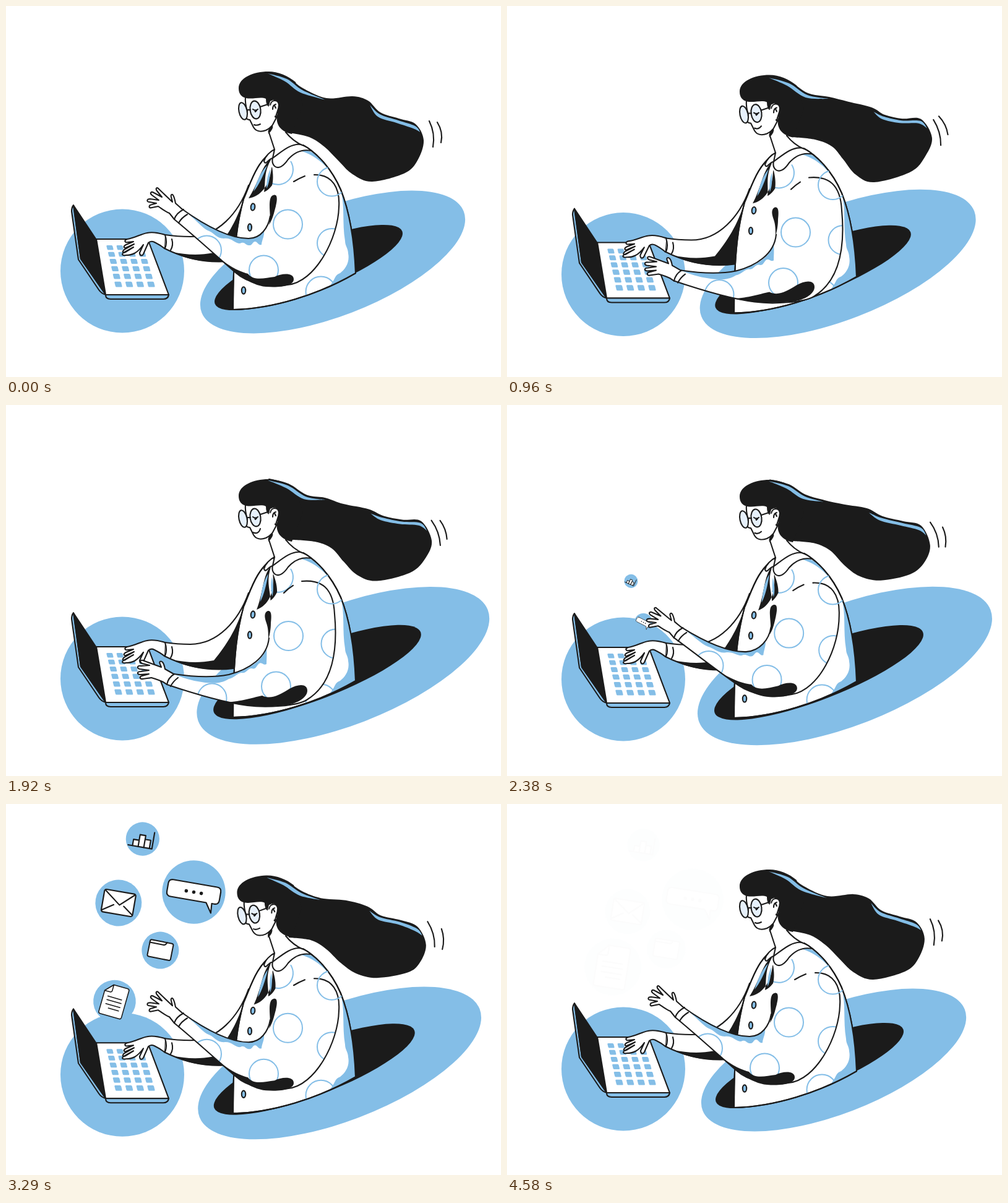
Recreate the animation shown at these times as an HTML page. Size 800 by 600 pixels, loop 4.62 s.

```html
<!DOCTYPE html>
<html lang="en">
<head>
<meta charset="utf-8">
<title>Typing</title>
<style>
html, body { margin: 0; width: 100%; height: 100%; overflow: hidden; background: #fff }
svg { display: block; width: 100vw; height: 100vh }
.line { fill: none; stroke: #1b1b1b; stroke-width: 2.1; stroke-linecap: round; stroke-linejoin: round }
.white { fill: #fff }
.blue { fill: #84bee7 }
.black { fill: #1b1b1b }
.ring { fill: none; stroke: #84bee7; stroke-width: 2 }
.line.white { fill: #fff }
.line.blue { fill: #84bee7 }
.line.black { fill: #1b1b1b }
</style>
</head>
<body>
<svg viewBox="0 0 800 600">
  <defs>
    <clipPath id="torsoClip"><use href="#torso"/></clipPath>
    <clipPath id="armClip"><path id="armMask"/></clipPath>
  </defs>
  <ellipse id="rim" class="blue" rx="227" ry="87.3"/>
  <ellipse id="pit" class="black" rx="162.3" ry="39"/>
  <circle id="disc" class="blue" cx="188" cy="428.5" r="100"/>
  <g id="icons"></g>
  <path id="hair" class="black"/>
  <path id="swish" class="line"/>
  <g id="figure">
    <path class="line blue" d="M109 322Q106 326 106 332L117 410L150 459Q154 465 161 467L121 409Z"/>
    <path class="line black" d="M109.500 323L146 378L161 466L121 409Z"/>
    <path class="line white" d="M146 377H229L263 467H161Z"/>
    <path class="line blue" d="M161 467H263Q262 474 254 474H169Q161 474 161 467Z"/>
    <g id="keys" class="blue"></g>

    <path class="line white" d="M392 290C376 335 342 373 298 373C282 373 270 372 257 370L256 392C280 404 320 418 368 412L384 312Z"/>
    <path class="black" d="M384 312C372 350 356 374 336 399C310 404 290 402 268 398C300 413 335 417 368 412L372 370Z"/>
    <g id="farHand">
      <path class="line white" d="M257 370C247 367 237 365 228 367C217 369 209 375 196 377C190 379 192 383 197 382L206 381L194 386C188 389 191 393 196 390L207 385L191 394C187 398 189 400 193 398L206 390L190 399C186 402 189 404 194 403C204 403 212 400 222 386L216 399C216 404 220 405 222 401L230 383Q234 379 240 382Q250 387 256 392"/>
    </g>
    <path class="line" d="M257 370Q261 382 257 392M268 377Q271 387 266 395"/>

    <path id="torso" class="line white" d="M434 232C404 252 396 285 384 312C375 345 367 385 367 491C430 490 505 467 565 432C563 380 556 335 541 297C525 260 500 236 480 225Z"/>
    <g clip-path="url(#torsoClip)">
      <path class="blue" d="M541 297C556 335 563 380 565 432L523 453C534 440 530 436 540 432C548 426 556 415 553 400C553 392 548 388 548 380C543 350 548 325 541 297ZM475 234C492 230 512 244 526 270C510 250 495 240 475 234Z"/>
      <path class="ring" d="M460 251A24.500 24.500 0 0 1 428 286"/>
      <circle class="ring" cx="509" cy="462" r="24.500"/>
    </g>
    <path class="line" d="M434 232C404 252 396 285 384 312C375 345 367 385 367 491C430 490 505 467 565 432C563 380 556 335 541 297C525 260 500 236 480 225"/>
    <g class="line blue">
      <ellipse cx="399" cy="325" rx="3.300" ry="5.600" transform="rotate(6 399 325)"/>
      <ellipse cx="394" cy="358" rx="3" ry="5.600"/>
      <ellipse cx="384" cy="460" rx="3.200" ry="5.600"/>
    </g>

    <path class="white" d="M424 196L434 234L456 246L482 227L452 204L438 170Z"/>
    <path class="line" d="M424.500 203L434 232M452 204Q463 218 480 226"/>
    <g id="head">
      <path class="line white" d="M387 146C386 158 388 164 390 170L388 180Q389 184 394 184C396 188 398 192 400 196C404 203 412 204 420 201Q428 197 431 192L440 175L430 140Z"/>
      <path class="black" d="M424 207Q422 197 431 192Q433 199 424 207Z"/>
      <path class="black" d="M376 133C376 116 400 106 424 106C440 106 456 113 468 123L480 160L462 207C446 204 432 192 440 170L441 158L434 151L427 154L424.500 163Q420 160 420 150C412 146 400 151 388 149Q376 146 376 133Z"/>
      <path class="line white" d="M427 161C428 151 440 150 441 160C441 168 437 172 436 180L428 172"/>
      <path class="white" d="M422 165L428 160L436 174L430 188Z"/>
      <path class="line" d="M431 167Q431 160 436 159M434 161L436 165"/>
      <g class="line" style="fill:#e6f0fb">
        <ellipse cx="383" cy="170" rx="6.500" ry="14" transform="rotate(-12 383 170)"/>
        <ellipse cx="403" cy="168" rx="8.500" ry="14.500" transform="rotate(-8 403 168)"/>
      </g>
      <path class="line" d="M390 168H395M411 163L423 159"/>
      <path class="line" d="M399 167Q403 170 407 167M402 169L403 171L405 169"/>
      <path id="mouth" class="line"/>
    </g>
    <g id="scarf">
      <path class="black" d="M426 249C412 262 407 288 392 311C412 308 426 290 429 262L430 260C432 272 432 282 430 290Q424 298 417 301C420 285 416 270 428 249Z"/>
      <path class="blue" d="M422 258C412 268 407 280 400 300C408 291 416 274 422 258ZM427 264C422 275 421 286 421 295C425 288 427 276 427 264Z"/>
    </g>
    <path class="line white" d="M434 232C427 235 419 243 417 251Q418 255 421 253Q427 247 431 246Z"/>
    <path class="line white" d="M431 246C445 236 460 222 476 224Q486 227 493 234C478 231 465 238 456 248C448 260 440 264 434 259Q429 254 431 246Z"/>

    <g id="arm"></g>
    <circle class="ring" cx="526.500" cy="284" r="23.500" clip-path="url(#torsoClip)"/>
  </g>
  <path id="shine1" class="blue"/>
  <path id="shine2" class="blue"/>
  <path id="trail1" class="line" d="M268 286Q242 308 236 340"/>
  <path id="trail2" class="line" d="M281 289Q258 305 250 335"/>
</svg>
<script>
const LOOP = 4620, TIMES = [0, 1380, 2750, 3880];
const $ = id => document.getElementById(id);
const set = (el, name, value) => el.setAttribute(name, value);
const NUMBER = /-?\d+(\.\d+)?/g;
const numbers = text => text.match(NUMBER).map(Number);
const clamp = x => Math.max(0, Math.min(1, x));
const smooth = (t, a, b) => { const u = clamp((t - a) / (b - a)); return u * u * (3 - 2 * u); };
const cubic = u => u < .5 ? 4 * u ** 3 : 1 - 4 * (1 - u) ** 3;

// Replaces each number of path a by its blend with path b; arc flags stay whole.
function mix(a, b, p) {
  const to = numbers(b);
  let i = 0;
  return a.replace(NUMBER, n => +(+n + (to[i++] - n) * p).toFixed(2));
}

// Periodic spline in time through four poses.
function pose(keys, t) {
  const n = TIMES.length, at = i => TIMES[(i + n) % n] + LOOP * Math.floor(i / n);
  const i = TIMES.findLastIndex(k => k <= t), span = at(i + 1) - at(i), u = (t - at(i)) / span;
  const key = k => keys[(k + n) % n];
  return key(i).map((v, c) => {
    const a = key(i - 1)[c], w = key(i + 1)[c], z = key(i + 2)[c];
    const m = (w - a) / (at(i + 1) - at(i - 1)) * span, k = (z - v) / (at(i + 2) - at(i)) * span;
    const s = u * u * (3 - 2 * u);
    return v + (w - v) * s + m * u * (1 - u) ** 2 + k * u * u * (u - 1);
  });
}

// Smooth open curve through points.
function curve(points, start = 'M') {
  const at = i => points[Math.max(0, Math.min(points.length - 1, i))];
  let d = start + at(0).join(' ');
  for (let i = 0; i < points.length - 1; i++) {
    const [a, b, c, e] = [at(i - 1), at(i), at(i + 1), at(i + 2)];
    d += `C${b[0] + (c[0] - a[0]) / 6} ${b[1] + (c[1] - a[1]) / 6} ${c[0] - (e[0] - b[0]) / 6} ${c[1] - (e[1] - b[1]) / 6} ${c[0]} ${c[1]}`;
  }
  return d;
}

const HAIR = [
  '424 106 455 115 480 133 518 149 560 146 585 153 605 172 635 182 662 191 675 217 666 248 645 270 592 284 560 272 537 250 515 228 490 212 458 205',
  '424 116 457 125 488 144 520 147 548 158 590 168 612 178 640 183 671 182 690 213 680 241 655 268 595 285 565 273 545 248 528 228 500 218 460 215',
  '424 120 455 128 480 144 510 155 545 160 580 166 605 180 640 189 668 199 681 230 672 258 650 275 605 283 570 277 545 262 520 237 495 224 460 220',
  '421 110 450 119 478 137 510 148 555 150 590 164 607 179 635 185 662 195 677 222 666 252 648 269 592 280 560 270 537 250 515 230 492 215 455 210'
].map(numbers);
const SWISH = [
  '684 186 694 206 690 228 697 188 707 204 703 221',
  '690 184 703 203 704 225 699 178 711 190 715 207',
  '682 191 695 209 695 231 705 203 711 219 706 236',
  '682 188 693 209 691 230 701 196 708 212 705 229'
].map(numbers);

// Near arm: raised and typing shapes.
const TOP = ['M284 328C320 354 360 376 392 376C412 376 424 358 427 340',
             'M281 422C315 427 345 428 370 423C402 415 432 396 435 364'];
const UNDER = ['M498 273C528 272 540 295 538 325C537 375 500 447 455 451C425 456 390 448 372 432C355 418 320 385 272 345',
               'M488 272C520 269 539 283 541 325C547 390 536 440 496 464C480 474 430 477 400 473C370 469 320 456 270 439'];
const outline = k => TOP[k] + 'L' + UNDER[k].slice(1) + 'Z';
const ring = (x, y) => `M${x - 23.5} ${y}a23.5 23.5 0 1 0 47 0a23.5 23.5 0 1 0 -47 0`;
const ARM = [
  ['white', outline(0), outline(1)],
  ['blue', 'M284 328C330 358 365 376 392 376C404 376 412 370 417 364C418 372 413 380 413 386C408 388 406 380 402 381C398 382 398 388 392 387C386 386 386 380 378 384C370 384 364 374 352 376C340 376 336 366 326 363C316 358 305 343 284 328Z',
    'M281 422C315 427 345 428 370 423C402 415 424 402 431 380C432 390 431 398 431 406C426 409 424 402 419 405C414 410 414 415 407 413C401 412 398 422 391 420C384 420 378 429 370 430C356 439 340 437 326 435C310 433 295 428 281 422Z'],
  ['ring', ring(455.5, 353) + ring(416.5, 427) + ring(324.5, 395) + ring(526.5, 383.5),
    ring(466.5, 360.5) + ring(446.5, 442) + ring(343, 461) + ring(543, 373)],
  ['black', 'M345 408C365 424 380 430 391 433C400 445 418 440 434 438C446 432 465 431 465 442C465 452 445 456 420 454C395 452 368 430 345 408Z',
    'M366 468C392 466 405 461 424 457C438 464 452 456 468 446C482 438 497 437 497 449C497 460 480 472 455 473C420 476 395 473 366 468Z'],
  ['black', 'M432 306C440 303 438 316 436 324C433 335 431 345 425 354C428 340 426 335 426 322C426 312 428 307 432 306Z',
    'M433 320C440 319 439 330 438 340C438 350 436 360 434 366C434 350 433 345 430 337C427 328 428 322 433 320Z'],
  ['line', TOP[0] + UNDER[0] + 'M465 284Q473 279 483 275', TOP[1] + UNDER[1] + 'M459 291Q466 284 474 279'],
  ['line white', 'M284 328L274 319C273 314 272 309 270 306C268 303 266 306 267 309L269 317L247 296C244 292 241 295 244 299L252 309L239 302C234 299 232 303 236 306L247 314L233 312C227 312 227 317 232 317L243 319L236 321C230 322 230 328 236 326L246 324C252 328 258 333 264 335L272 345',
    'M281 422L267 414C266 409 265 405 263 403C260 400 257 402 259 406L261 411L231 400C226 399 226 403 230 405L242 408L228 409C222 408 221 413 226 414L241 416L228 418C222 418 221 422 226 423L241 422L230 425C225 426 226 431 231 430L245 428C252 430 260 433 264 435L270 439'],
  ['line', 'M272 345Q275 335 287 329M279 351Q283 343 293 337', 'M270 439Q272 428 282 422M276 442Q280 434 288 428']
];
$('arm').innerHTML = ARM.map(([kind]) => `<path class="${kind}"${kind === 'ring' ? ' clip-path="url(#armClip)"' : ''}/>`).join('');

let keys = '';
for (let r = 0; r < 6; r++) for (let c = 0; c < 4; c++) {
  const x = 168 + 2.6 * r + c * (16.3 + .27 * r), y = 391 + 10.5 * r + .25 * r * r;
  keys += `<rect x="-5" y="-4" width="${10 + r * .15}" height="${7.6 + r * .25}" rx="1.5" transform="translate(${x} ${y}) skewX(14)"/>`;
}
$('keys').innerHTML = keys;

// x, y, radius, start time, drift while fading, artwork
const ICONS = [
  [219.5, 56.5, 26.5, 1920, 1, 10, '<path class="line white" d="M-14 13V3H-5V13M-5 13V-6H4V13M4 13V0H13V13"/><path class="line" d="M-21 13H17V-13"/>'],
  [299, 142.5, 50, 1970, 1, 12, '<path class="line white" d="M-35 -14H35Q42 -14 42 -7V6Q42 13 35 13H31L32 28L22 13H-35Q-42 13 -42 6V-7Q-42 -14 -35 -14Z"/><g class="black"><circle cx="-12" r="2.7"/><circle r="2.7"/><circle cx="12" r="2.7"/></g>'],
  [182, 160, 36.6, 2300, 13, 14, '<rect class="line white" x="-25" y="-18" width="50" height="36" rx="3"/><path class="line" d="M-24 -17L2 3L24 -17M-24 15L-7 4M24 15L9 4"/>'],
  [251.5, 222, 31.5, 2550, 6, 13, '<rect class="line white" x="-20" y="-15" width="40" height="29" rx="3"/><path class="line" d="M-20 -10H4Q7 -10 9 -15"/>'],
  [172, 276.5, 46.2, 2700, -1, -13, '<path class="line white" d="M-11 -34H20Q24 -34 24 -30V30Q24 34 20 34H-23Q-27 34 -27 30V-17Z"/><path class="line white" d="M-11 -34V-21Q-11 -17 -15 -17H-27Z"/><path class="line" d="M-17 -7H14M-17 1H15M-17 10H15M-9 18H14"/>']
];
$('icons').innerHTML = ICONS.map(icon => `<g><circle class="blue" r="${icon[2]}"/>${icon[6]}</g>`).join('');

// Icons fly out of the laptop, spread a little too far, settle and fade.
function drawIcons(t) {
  const fall = smooth(t, 3780, 4640), loose = 1 - smooth(t, 2750, 3700);
  ICONS.forEach(([x, y, , start, dx, dy], i) => {
    const p = cubic(clamp((t - start) / 1000)), spread = p * (1 + .1 * loose);
    const px = 186 + (x - 186) * spread + dx * fall, py = 432 + (y - 432) * p + dy * fall;
    const el = $('icons').children[i];
    set(el, 'transform', `translate(${px} ${py}) rotate(${9 + 22 * (1 - p) + 2 * loose}) scale(${p * (1 + .06 * loose)})`);
    set(el, 'opacity', 1 - smooth(t, 4250, 4600));
  });
}

function drawHair(t) {
  const flat = pose(HAIR, t), points = [];
  for (let i = 0; i < flat.length; i += 2) points.push([flat[i], flat[i + 1]]);
  set($('hair'), 'd', curve(points) + 'L440 185Z');
  const shine = edge => {
    const last = edge.length - 1;
    const outer = edge.map(([x, y]) => [x - 1, y + 3]);
    const inner = edge.map(([x, y], i) => i % last ? [x - 4, y + 7] : outer[i]).reverse();
    return curve(outer) + curve(inner, 'L') + 'Z';
  };
  const [x5, y5] = points[5], [x8, y8] = points[8], [x9, y9] = points[9];
  set($('shine1'), 'd', shine(points.slice(0, 4)));
  set($('shine2'), 'd', shine([[x5 + 4, y5 + 4], ...points.slice(6, 9), [(x8 + x9) / 2 + 2, (y8 + y9) / 2 - 3]]));
  const s = pose(SWISH, t);
  set($('swish'), 'd', `M${s.slice(0, 2)}Q${s.slice(2, 6)}M${s.slice(6, 8)}Q${s.slice(8)}`);
}

function draw(t) {
  const swing = (1 - Math.cos(2 * Math.PI * t / LOOP)) / 2, bob = 15 * swing;
  const size = 1 + .112 * swing;
  set($('rim'), 'transform', `translate(${528 + 18 * swing} ${414 + 8 * swing}) rotate(-21.1) scale(${size})`);
  set($('pit'), 'transform', `translate(${489 + 15 * swing} ${423 + 9.7 * swing}) rotate(-21.2) scale(${size})`);
  set($('disc'), 'transform', `translate(0 ${bob})`);
  set($('figure'), 'transform', `translate(0 ${bob})`);
  set($('scarf'), 'transform', `rotate(${-12.5 * swing} 428 250)`);

  const lean = smooth(t, 2750, 3880) - smooth(t, 3880, LOOP);
  set($('head'), 'transform', `rotate(${-3.5 * lean} 432 225)`);
  const smile = smooth(t, 700, 1250) - smooth(t, 1950, 2600);
  set($('mouth'), 'd', mix('M401 192Q405 194 411 191', 'M399 192Q408 196 411 186', smile));

  const tap = t > 270 && t < 1890 ? Math.sin(Math.PI * (t - 270) / 540) ** 2 : 0;
  set($('farHand'), 'transform', `rotate(${3.5 * tap} 257 381)`);

  const down = smooth(t, 40, 500) - smooth(t, 1920, 2550);
  const pull = smooth(t, 1600, 1920) - smooth(t, 1920, 2550);
  set($('arm'), 'transform', `translate(${-10 * pull} ${-pull})`);
  ARM.forEach(([, raised, typing], i) => set($('arm').children[i], 'd', mix(raised, typing, down)));
  set($('armMask'), 'd', mix(outline(0), outline(1), down));

  const trail = 40 * Math.max(0, Math.min((t - 150) / 150, (580 - t) / 280));
  for (const id of ['trail1', 'trail2']) {
    set($(id), 'stroke-dasharray', `${trail} 200`);
    set($(id), 'visibility', trail ? 'visible' : 'hidden');
  }
  drawHair(t);
  drawIcons(t);
}

function frame() {
  draw(performance.now() % LOOP);
  requestAnimationFrame(frame);
}
frame();
</script>
</body>
</html>
```
